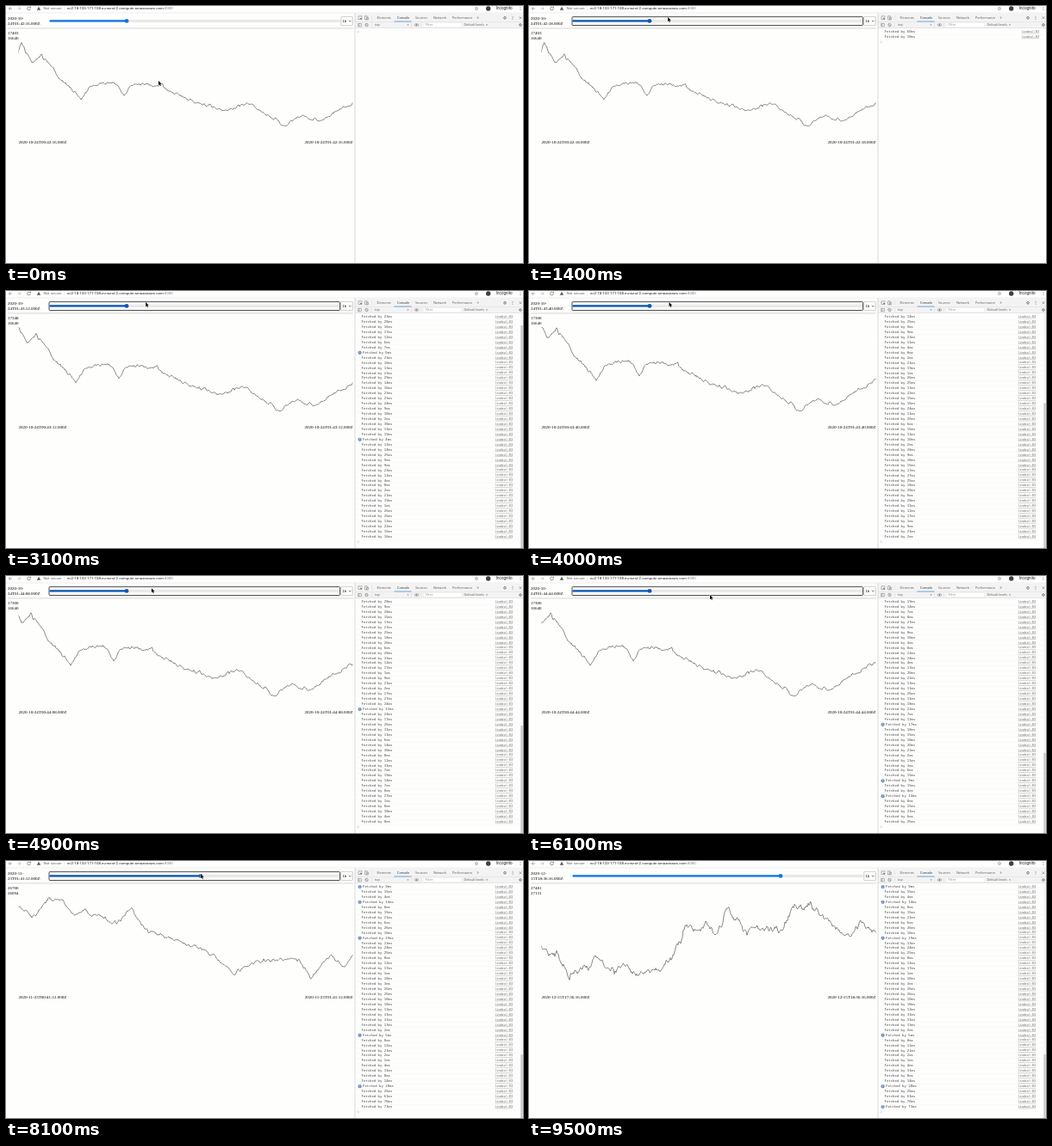
An HTML page with a canvas that plays this animation: 600 px wide and 299 px high, repeating every 9600 ms.

```html
<!DOCTYPE html>
<html lang="en">
<head>
<meta charset="utf-8">
<title>Price chart</title>
<style>
html, body { margin: 0; width: 100%; height: 100%; overflow: hidden; background: #fefefd; }
canvas { display: block; width: 600px; height: 299px; }
</style>
</head>
<body>
<canvas id="stage" width="600" height="299"></canvas>
<script>
const ctx = document.getElementById('stage').getContext('2d');
const LOOP = 9600, ZOOM = 3.2, PAPER = '#fefefd', GREY = '#5a5a5a';
const LEFT = 14.5, RIGHT = 402.5, TOP = 43, BOTTOM = 139;
const ROW = 5.953, VISIBLE_ROWS = 44;
const SERIF = '"Liberation Serif", serif', MONO = '"DejaVu Sans Mono", monospace';
const UI = '"Open Sans", sans-serif', BAR = 'Roboto, sans-serif';

// Main turns of each chart as x, y pairs; fractal noise fills in the rest.
const OCTOBER = {
  turns: [12,62, 18,43, 30,66, 41,56, 60,80, 87,109, 97,93, 126,88, 137,104, 145,92, 178,92, 210,108,
    256,122, 280,112, 322,138, 344,128, 362,134, 399,114, 424,104],
  roughness: 2.6, seed: 7
};
const NOVEMBER = {
  turns: [12,52, 32,64, 50,46, 66,47, 78,62, 92,58, 128,72, 146,54, 158,78, 182,87, 240,108, 266,132,
    284,117, 340,113, 354,138, 376,110, 392,122, 405,109],
  roughness: 3.2, seed: 230
};
const DECEMBER = {
  turns: [12,100, 35,110, 47,135, 62,126, 82,109, 92,125, 152,128, 170,105, 183,75, 205,77, 217,85, 230,51,
    250,82, 280,78, 293,81, 306,54, 330,50, 345,69, 366,87, 386,72, 405,84],
  roughness: 6.5, seed: 410
};

// Keyframes as time, value pairs.
const SECONDS = [1000,0, 1200,2, 1500,2, 2200,24, 3100,56, 4900,112, 6100,148, 7200,182];
const ROWS = [1000,0, 1200,2, 1500,2, 2200,18, 3100,47, 6100,133, 7200,165, 7900,165, 8000,167, 8100,168];
const CURSOR_X = [400,177, 1100,161, 4800,163, 5600,210, 7200,210, 7800,226, 8200,226, 8600,289];
const CURSOR_Y = [400,87, 1100,13, 4800,13, 5600,22, 7200,22, 7800,15, 8200,15, 8600,18];

const REPEATED = new Set([10, 27, 76, 113, 124, 127, 134, 153, 163]);

const random = n => { const v = Math.sin(n * 127.1) * 43758.5453; return v - Math.floor(v); };

// The first fetch and those after the last key press are slow.
const fetchTime = row => Math.floor(row === 0 || row > 164 ? 60 + random(row) * 24 : random(row) * 32);

// Linear interpolation through flat x, y pairs.
function follow(pairs, x) {
  if (x <= pairs[0]) return pairs[1];
  for (let i = 2; i < pairs.length; i += 2) {
    if (x <= pairs[i]) {
      const k = (x - pairs[i - 2]) / (pairs[i] - pairs[i - 2]);
      return pairs[i - 1] + (pairs[i + 1] - pairs[i - 1]) * k;
    }
  }
  return pairs[pairs.length - 1];
}

function valueNoise(x, seed) {
  const cell = Math.floor(x), a = random(cell + seed), b = random(cell + 1 + seed);
  return (a + (b - a) * (x - cell)) * 2 - 1;
}

const fractalNoise = (x, seed) =>
  0.65 * valueNoise(x / 5.5, seed) + 0.6 * valueNoise(x / 2.3, seed + 1000) + 0.3 * valueNoise(x, seed + 2000);

function text(str, x, y, size, family, color = '#000', align = 'left') {
  ctx.save();
  ctx.translate(x, y);
  ctx.scale(1 / ZOOM, 1 / ZOOM);
  ctx.font = `${size}px ${family}`;
  ctx.fillStyle = color;
  ctx.textAlign = align;
  ctx.textBaseline = 'middle';
  ctx.fillText(str, 0, 0);
  ctx.restore();
}

function rect(x, y, w, h, color) {
  ctx.fillStyle = color;
  ctx.fillRect(x, y, w, h);
}

function dot(x, y, r, color) {
  ctx.fillStyle = color;
  ctx.beginPath();
  ctx.arc(x, y, r, 0, 7);
  ctx.fill();
}

function ring(x, y, r, color, width = 0.5, end = Math.PI * 2) {
  ctx.strokeStyle = color;
  ctx.lineWidth = width;
  ctx.beginPath();
  ctx.arc(x, y, r, 0, end);
  ctx.stroke();
}

function path(points, color, width = 0.5) {
  ctx.strokeStyle = color;
  ctx.lineWidth = width;
  ctx.beginPath();
  for (let i = 0; i < points.length; i += 2) ctx.lineTo(points[i], points[i + 1]);
  ctx.stroke();
}

function shape(points, color) {
  ctx.fillStyle = color;
  ctx.beginPath();
  for (let i = 0; i < points.length; i += 2) ctx.lineTo(points[i], points[i + 1]);
  ctx.fill();
}

function box(x, y, w, h, r, stroke, width, fill) {
  ctx.beginPath();
  ctx.roundRect(x, y, w, h, r);
  if (fill) {
    ctx.fillStyle = fill;
    ctx.fill();
  }
  if (stroke) {
    ctx.strokeStyle = stroke;
    ctx.lineWidth = width;
    ctx.stroke();
  }
}

const arrowDown = (x, y) => shape([x - 1, y - 0.6, x + 1, y - 0.6, x, y + 0.8], '#666');
const gear = (x, y) => ring(x, y, 1.3, '#6e6e6e', 0.9);
const divider = (x, y) => rect(x, y, 0.3, 5, '#ccc');

function kebab(x, y) {
  for (const d of [-1.5, 0, 1.5]) dot(x, y + d, 0.45, '#555');
}

function star(x, y) {
  const points = [];
  for (let i = 0; i <= 10; i++) {
    const a = i * Math.PI / 5 - Math.PI / 2, r = i % 2 ? 0.9 : 2;
    points.push(x + r * Math.cos(a), y + r * Math.sin(a));
  }
  path(points, GREY, 0.4);
}

function drawToolbar() {
  path([7, 3, 3.4, 3], GREY);
  path([5, 1.3, 3.3, 3, 5, 4.7], GREY);
  path([13.3, 3, 17, 3], '#999');
  path([15.4, 1.3, 17.1, 3, 15.4, 4.7], '#999');
  ring(26.5, 3, 1.8, GREY, 0.6, 5.2);
  shape([26.9, 2.3, 28.8, 2.3, 28.8, 0.5], GREY);
  shape([38, 0.8, 40.2, 4.8, 35.8, 4.8], GREY);
  text('Not secure', 43.5, 3, 14, BAR, '#5f6368');
  rect(67.7, 0.8, 0.3, 4.5, '#ccc');
  const host = 'ec2-18-133-171-108.eu-west-2.compute.amazonaws.com';
  text(host, 71, 3, 14, BAR, '#202124');
  ctx.font = `14px ${BAR}`;
  text(':8080', 71 + ctx.measureText(host).width / ZOOM, 3, 14, BAR, '#80868b');
  star(546, 3);
  dot(559.7, 3, 2.7, '#3c4043');
  text('Incognito', 568.8, 3, 14.5, BAR, '#202124');
  kebab(597, 3);
  rect(0, 7.8, 600, 0.4, '#d5d5d5');
}

function drawDevtools() {
  rect(405, 8.2, 195, 17.5, '#f3f3f3');
  rect(404.7, 8.2, 0.6, 291, '#c4c4c4');
  path([411, 15.5, 409, 15.5, 409, 11.8, 413, 11.8, 413, 13.4], GREY, 0.4);
  shape([411, 13.5, 413.5, 14.8, 411.8, 16.3], GREY);
  box(416.5, 11.6, 2.6, 4.2, 0.3, GREY, 0.4);
  box(418.5, 13, 2, 3, 0.3, GREY, 0.4);
  divider(424, 11.2);
  const tabs = { Elements: 430.5, Console: 454, Sources: 475, Network: 496, Performance: 518 };
  for (const [label, x] of Object.entries(tabs))
    text(label, x, 13.8, 12.2, UI, label === 'Console' ? '#222' : GREY);
  rect(450.5, 17.7, 20, 0.7, '#1a73e8');
  text('»', 546.5, 13.5, 14, UI, GREY);
  gear(579, 13.8);
  kebab(588, 13.8);
  path([595.6, 12.4, 598.4, 15.2], GREY);
  path([598.4, 12.4, 595.6, 15.2], GREY);
  rect(405, 18.4, 195, 0.3, '#ccc');

  box(408.6, 20.4, 3.8, 3.4, 0.2, GREY, 0.4);
  path([409.8, 20.4, 409.8, 23.8], GREY, 0.4);
  ring(418.5, 22, 1.7, GREY);
  path([417.3, 20.8, 419.7, 23.2], GREY, 0.4);
  for (const x of [424, 470.5, 481.5]) divider(x, 19.5);
  text('top', 428, 22, 12, UI, GREY);
  arrowDown(466.5, 22);
  ctx.lineWidth = 0.4;
  ctx.beginPath();
  ctx.ellipse(476.5, 22, 2.4, 1.4, 0, 0, 7);
  ctx.stroke();
  dot(476.5, 22, 0.8, GREY);
  box(484.5, 19.6, 44, 4.8, 0.3, '#ddd', 0.3, '#fff');
  text('Filter', 486.5, 22, 12, UI, '#888');
  text('Default levels', 531.5, 22, 12, UI, GREY);
  arrowDown(558, 22);
  gear(597, 22);
  rect(405, 25.5, 195, 0.4, '#ccc');
}

function drawConsole(count, lastRepeated) {
  const first = Math.max(0, count - VISIBLE_ROWS);
  const rowY = i => 30 + (i - first) * ROW;
  const view = 273, content = (count + 1) * ROW + 2, scrolls = content > view;
  const linkEnd = scrolls ? 588 : 592;

  for (let i = first; i < count; i++) {
    const y = rowY(i), repeated = REPEATED.has(i) || (lastRepeated && i === count - 1);
    if (repeated) {
      dot(410.6, y, 2.1, '#7288bd');
      text('2', 410.6, y, 9, UI, '#fff', 'center');
    }
    text(`Fetched by ${fetchTime(i)}ms`, repeated ? 414 : 412.5, y, 12.7, MONO, '#4a4a4a');
    text('(index):83', linkEnd, y, 11, MONO, '#606060', 'right');
    rect(linkEnd - 20.6, y + 1.8, 20.6, 0.3, '#777');
    rect(405.3, y + ROW / 2, 192, 0.25, '#eee');
  }
  const y = rowY(count);
  path([408.3, y - 1, 409.4, y, 408.3, y + 1], '#5b8def');

  if (scrolls) {
    const size = view * view / content;
    rect(597, 26, 3, view, '#f6f6f6');
    rect(597.4, 299 - size, 2.2, size, '#c6c6c6');
  }
}

function drawChart({ turns, roughness, seed }, shift, ceiling) {
  ctx.save();
  ctx.beginPath();
  ctx.rect(LEFT, 30, RIGHT - LEFT, 115);
  ctx.clip();
  const points = [];
  for (let x = Math.floor(LEFT + shift) - 1; x <= RIGHT + shift + 1; x += 0.5) {
    const level = follow(turns, x) + fractalNoise(x, seed) * roughness;
    const y = TOP + (level - ceiling) * (BOTTOM - TOP) / (BOTTOM - ceiling);
    points.push(x - shift, Math.min(BOTTOM + 0.5, Math.max(TOP - 0.5, y)));
  }
  ctx.lineJoin = 'round';
  path(points, '#000', 0.48);
  ctx.restore();
}

function drawPage({ end, high, low, thumb, chart, shift = 0, ceiling = TOP }, hover, focused) {
  const iso = new Date(end).toISOString();
  text(iso.slice(0, 8), 2, 14.7, 16, SERIF);
  text(iso.slice(8), 2, 20.4, 16, SERIF);

  const blue = hover ? '#0a58b8' : '#0f78e6';
  box(50.5, 16.4, 337, 2, 1, '#b5b5b5', 0.3, '#efefef');
  box(50.5, 16.3, thumb - 50.5, 2.2, 1, null, 0, blue);
  dot(thumb, 17.4, 2.4, blue);

  box(388.8, 12.4, 13.6, 10.2, 0.8, '#767676', 0.35);
  text('1h', 390.4, 17.6, 13.33, '"Liberation Sans", sans-serif');
  path([397.9, 16.8, 399.3, 18.2, 400.7, 16.8], '#222', 0.6);
  if (focused) box(50, 12.6, 337.6, 9.9, 0.9, '#151515', 0.75);

  rect(2, 25.7, 401, 0.5, '#b0b0b0');
  text(high, 2, 31.4, 16, SERIF);
  text(low, 2, 37.2, 16, SERIF);
  drawChart(chart, shift, ceiling);
  text(new Date(end - 3600000).toISOString(), LEFT, 158.2, 16, SERIF);
  text(iso, RIGHT, 158.2, 16, SERIF, '#000', 'right');
}

function drawCursor(x, y) {
  const outline = [[0, 0], [0, 5.2], [1.2, 4.1], [2, 6], [2.9, 5.6], [2.1, 3.8], [3.7, 3.7]]
    .flatMap(([dx, dy]) => [x + dx, y + dy]);
  path([...outline, x, y], '#fff', 0.8);
  shape(outline, '#000');
}

function pageAt(t) {
  if (t >= 9000) return {
    end: Date.UTC(2020, 11, 15, 18, 36, 16), high: 27481, low: 27131, thumb: 292, chart: DECEMBER
  };
  if (t >= 8000) return {
    end: Date.UTC(2020, 10, 23, 1, 41, 12), high: 26700, low: 26094, thumb: 226, chart: NOVEMBER
  };
  // The peak scrolls out on the left, so the scale tightens.
  const seconds = Math.round(follow(SECONDS, t));
  const high = seconds < 33 ? 17403 : seconds < 62 ? 17348 : 17300;
  return {
    end: Date.UTC(2020, 9, 24, 1, 42, 16 + seconds), high, low: 16640, thumb: 140, chart: OCTOBER,
    shift: seconds * (RIGHT - LEFT) / 3600,
    ceiling: TOP + (17403 - high) / 763 * (BOTTOM - TOP)
  };
}

function draw(now) {
  // The screen updates ten times a second.
  const t = Math.floor((now % LOOP) / 100) * 100;
  const x = follow(CURSOR_X, t), y = follow(CURSOR_Y, t);
  const cursorShown = t < 9000;
  const hover = cursorShown && y >= 12 && y <= 23;
  rect(0, 0, 600, 299, PAPER);
  drawToolbar();
  drawPage(pageAt(t), hover, t >= 1100 && t < 9500);
  drawDevtools();
  drawConsole(Math.round(follow(ROWS, t)), t >= 9000);
  if (cursorShown) drawCursor(x, y);
}

let start;
function tick(now) {
  start ??= now;
  draw(now - start);
  requestAnimationFrame(tick);
}
draw(0);
requestAnimationFrame(tick);
</script>
</body>
</html>
```
